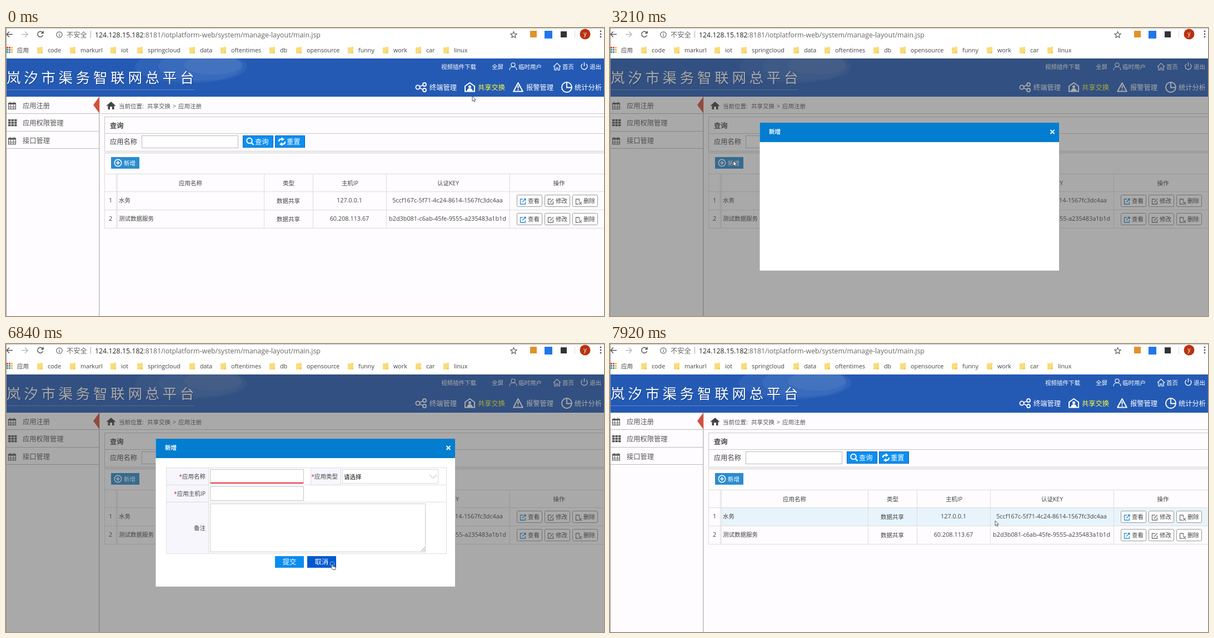
Animation, 1076 px wide and 520 px high, one loop 8000 ms. Source, as an HTML page:

```html
<!DOCTYPE html>
<html lang="zh">
<head>
<meta charset="utf-8">
<title>应用注册</title>
<style>
html, body { margin: 0; width: 100%; height: 100%; overflow: hidden; background: #fff; }
svg { display: block; width: 1076px; height: 520px; font-family: "Open Sans", "Noto Sans CJK SC", "Noto Sans CJK", sans-serif; }
text { white-space: pre; }
</style>
</head>
<body>
<svg id="stage" viewBox="0 0 1076 520" xmlns="http://www.w3.org/2000/svg"></svg>
<script>
const S = 10.5, M = 12.25, L = 10.85;
const INK = '#444', BLUE = '#0a8df0';

const box = (x, y, r, b, fill, stroke, more = '') => stroke
  ? `<rect x="${x + .5}" y="${y + .5}" width="${r - x - 1}" height="${b - y - 1}" fill="${fill}" stroke="${stroke}" ${more}/>`
  : `<rect x="${x}" y="${y}" width="${r - x}" height="${b - y}" fill="${fill}" ${more}/>`;
const txt = (x, mid, size, str, fill = INK, more = '') =>
  `<text x="${x}" y="${mid + size * .37}" font-size="${size}" fill="${fill}" ${more}>${str}</text>`;
const ctr = (x, mid, size, str, fill) => txt(x, mid, size, str, fill, 'text-anchor="middle"');
const end = (x, mid, str) => txt(x, mid, S, str.replace('*', '<tspan fill="#e22">*</tspan>'), INK, 'text-anchor="end"');
const line = (d, stroke, w = 1, more = '') => `<path d="${d}" fill="none" stroke="${stroke}" stroke-width="${w}" ${more}/>`;
const hl = (y, x, r, c) => box(x, y, r, y + 1, c);
const vl = (x, y, b, c) => box(x, y, x + 1, b, c);
const at = (x, y, art) => `<g transform="translate(${x} ${y})">${art}</g>`;
const layer = (id, art) => `<g id="${id}">${art}</g>`;
const join = (list, fn) => list.map(fn).join('');
const ring = (x, y, r, c, w = 1.5) => `<circle cx="${x}" cy="${y}" r="${r}" fill="none" stroke="${c}" stroke-width="${w}"/>`;
const dot = (x, y, r, c) => `<circle cx="${x}" cy="${y}" r="${r}" fill="${c}"/>`;

// Icons
const folder = '<path d="M0 1h6v-1h4v12h-10z" fill="#f9dc7a"/><path d="M7 12v-3h3z" fill="#e9bd4a"/>';
const calendar = box(0, 2, 14, 14, 'none', '#555') + box(0, 2, 14, 5, '#555') + vl(3, 0, 4, '#555') + vl(10, 0, 4, '#555') +
  line('M1 8.5h12M1 11h12M4.5 5v8M9.5 5v8', '#777');
const tiles = join([0, 1, 2], r => join([0, 1, 2], c => box(c * 5.5, r * 4.5, c * 5.5 + 4.5, r * 4.5 + 3.5, '#555')));
const house = '<path d="M0 7L8 0l8 7-1 1.3-1.5-1.3V14H10V9H6v5H2.5V7L1 8.3z" fill="#444"/>';

function browser() {
  const names = ['code', 'markurl', 'iot', 'springcloud', 'data', 'oftentimes', 'db', 'opensource', 'funny', 'work', 'car', 'linux'];
  const lefts = [75, 134, 207, 255, 349, 405, 493, 541, 634, 697, 756, 806];
  const hues = ['#e44', '#e44', '#fb3', '#3a6', '#48e', '#fb3', '#3a6', '#48e', '#fb3'];
  return box(0, 0, 1076, 55, '#fff') +
    line('M12 11.5H1M6 6.5l-5 5 5 5', '#555', 1.5) +
    line('M28 11.5h11M34 6.5l5 5-5 5', '#bbb', 1.5) +
    line('M66 8.5a5 5 0 1 0 .5 4.5M67 5.5v4h-4', '#555', 1.5) +
    ring(96, 12, 5.2, '#666', 1.2) + box(95.4, 11, 96.6, 15, '#666') + box(95.4, 8.8, 96.6, 10, '#666') +
    txt(109, 12, M, '不安全', '#666') + vl(152, 5, 18, '#aaa') +
    txt(160, 12, 12.35, '<tspan fill="#222">124.128.15.182</tspan>:8181/iotplatform-web/system/manage-layout/main.jsp', '#666') +
    line('M913.5 6.5l1.6 3.7 4 .4-3 2.7.9 4-3.5-2.1-3.5 2.1.9-4-3-2.7 4-.4z', '#555', 1.1) +
    box(943, 5, 955, 17, '#e0922c') + box(969, 5, 983, 19, '#2176ea') + box(998, 6, 1009, 17, '#303436') +
    vl(1023, 5, 18, '#ddd') + dot(1042, 11, 9.5, '#b8330f') + ctr(1042, 10, S, 'y', '#fff') +
    join([6, 11, 16], y => dot(1070, y, 1.4, '#555')) +
    join(hues, (c, i) => at(1 + i % 3 * 4, 34 + Math.floor(i / 3) * 4, box(0, 0, 3, 3, c))) +
    txt(20, 40, S, '应用') +
    join(names, (n, i) => at(lefts[i] - 19, 34, folder) + txt(lefts[i], 40, 10.75, n));
}

function header() {
  const w = '#fff';
  const title = '岚汐市渠务智联网总平台', spread = 'letter-spacing="5.7"';
  return `<clipPath id="top"><rect y="55" width="1076" height="69"/></clipPath><g clip-path="url(#top)">` +
    box(0, 55, 1076, 124, '#245ab4') +
    join([[333, 70, 101, 29], [350, 69, 76, 26], [372, 67, 52, 17]], ([x, y, a, b]) =>
      `<ellipse cx="${x}" cy="${y}" rx="${a}" ry="${b}" fill="#b4c8e0" fill-opacity=".08"/>`) + '</g>' +
    hl(111, 0, 338, '#5d8bcd') +
    txt(2, 91, 25.5, title, '#163f86', spread) + txt(1, 90, 25.5, title, w, spread) +
    txt(783, 70, S, '视频插件下载', w) + txt(874, 70, S, '全屏', w) +
    ring(912.5, 66.5, 3.5, w, 1.2) + line('M906 76c0-8 13-8 13 0', w, 1.2) + txt(922, 70, S, '临时用户', w) +
    line('M985 70l6.5-6.5 6.5 6.5M987 69v7h3v-4h3v4h3v-7', w, 1.2) + txt(1001, 70, S, '首页', w) +
    line('M1037 65a5.5 5.5 0 1 0 7 0M1040.5 62v7', w, 1.4) + txt(1050, 70, S, '退出', w) +
    ring(741, 107, 3.6, w, 1.8) + ring(753, 102, 3, w, 1.8) + ring(753, 112, 3, w, 1.8) + line('M744 106l6-3M744 108l6 3', w, 1.6) +
    txt(762, 107, M, '终端管理', w) +
    line('M826 114.5v-9.5l8.5-6 8.5 6v9.5z', w, 2) + dot(834.5, 106, 2.5, w) + '<path d="M829.5 114c0-7 10-7 10 0z" fill="#fff"/>' +
    txt(849, 107, M, '共享交换', '#ff3') +
    line('M921.5 99l8.3 15.5h-16.6z', w, 2, 'stroke-linejoin="round"') + line('M921.5 104v5M921.5 110.5v2', w, 2) +
    txt(936, 107, M, '报警管理', w) +
    ring(1009, 107, 9, w, 1.9) + line('M1009 99v8.5h8', w, 1.8) + txt(1023, 107, M, '统计分析', w);
}

function sidebar() {
  return vl(167, 124, 520, '#bbb') + vl(168, 124, 520, '#ddd') +
    '<path d="M168 124l-11 15 11 15z" fill="#d2503c"/>' +
    join(['应用注册', '应用权限管理', '接口管理'], (n, i) => {
      const y = 140 + i * 31.8;
      return at(4, y - 7, i === 1 ? tiles : calendar) + txt(30, y, M, n, '#555') + hl([154, 186, 217][i], 0, 168, '#bbb');
    });
}

const addButton = fill => box(189, 233, 240, 254, fill) + ring(201.5, 243.5, 6.2, '#fff', 1.5) +
  line('M198 243.5h7M201.5 240v7', '#fff', 1.7) + txt(212, 244, S, '新增', '#fff');

function rowButtons(y) {
  const g = '#777', b = '#2b8fd8';
  const art = [
    line('M5 1h-4.5v9h9v-4M4 6.5L10 .5M6.5 .5h3.5v3.5', b, 1.3),
    line('M6 1h-5.5v9h9v-5M4 7l6-6.5', g, 1.4),
    line('M5 10h-4.5V1h6v4M6 6l5 5M11 6l-5 5', g, 1.3)];
  return join(['查看', '修改', '删除'], (n, i) => {
    const x = 919 + i * 50;
    return box(x, y - 11, x + 46, y + 11, '#fff', '#999', 'rx="2"') + at(x + 6, y - 4, art[i]) + txt(x + 20, y, S, n);
  });
}

function content() {
  const grid = '#ddd', edge = '#c8c8c8';
  const cols = [[332, '应用名称'], [508.5, '类型'], [619, '主机IP'], [795.5, '认证KEY'], [995, '操作']];
  const rows = [['水务', '127.0.0.1', '5ccf167c-5f71-4c24-8614-1567fc3dc4aa'],
    ['测试数据服务', '60.208.113.67', 'b2d3b081-c6ab-45fe-9555-a235483a1b1d']];
  return at(181, 133, house) + txt(203, 141, S, '当前位置:', '#555') + txt(254, 141, S, '共享交换', '#555') +
    txt(300, 141, S, '&gt;', '#555') + txt(310, 141, S, '应用注册', '#555') + hl(154, 168, 1076, edge) +
    box(177, 160, 1080, 223, 'none', edge) + hl(190, 177, 1076, edge) +
    txt(187, 176, M, '查询', INK, 'font-weight="bold"') + txt(187, 205, M, '应用名称') +
    box(244, 194, 418, 217, '#fff', '#bbb') +
    box(426, 194, 481, 216, '#0a8ff2', '#0b5fae') + box(484, 194, 538, 216, '#0a8ff2', '#0b5fae') +
    ring(438, 203.5, 4.8, '#fff', 2) + line('M441.5 207l4 4', '#fff', 2.4) + txt(448, 205, M, '查询', '#fff') +
    line('M491 205c0-4 3-5 7-4M502 205c0 5-3 5-7 5', '#fff', 2.4) +
    '<path d="M496 197l5 4-5 3zM497 206l-5 4 5 3z" fill="#fff"/>' + txt(505, 205, M, '重置', '#fff') +
    box(177, 225, 1080, 362, 'none', grid) + hl(225, 177, 1076, edge) +
    layer('row1', box(201, 296, 1076, 328, '#e8f4fb')) + layer('row2', box(201, 329, 1076, 361, '#e8f4fb')) +
    join([263, 295, 328, 361], y => hl(y, 177, 1076, grid)) +
    join([199, 201, 465, 553, 685, 907], x => vl(x - 1, 263, 361, grid)) +
    join(cols, ([x, n]) => ctr(x, 280, S, n)) +
    join(rows, ([name, ip, key], i) => {
      const y = 312 + i * 33;
      return ctr(188, y - 1, L, i + 1) + txt(203, y - .5, S, name) + ctr(508, y, S, '数据共享') +
        ctr(618, y - 1, L, ip) + ctr(794.5, y - 1, L, key) + rowButtons(y);
    });
}

function dialog() {
  const e = '#ddd', label = '#f6f6fc', field = '#c2c2c2';
  const form = box(288, 223, 793, 379, '#fff', e) + box(289, 224, 364, 378, label) + box(549, 224, 602, 254, label) +
    join([254, 285], y => hl(y, 288, 793, e)) + vl(364, 223, 378, e) + vl(548, 223, 254, e) + vl(602, 223, 254, e) +
    end(359, 239, '*应用名称') + end(597, 239, '*应用类型') + end(359, 270, '*应用主机IP') + end(359, 332, '备注') +
    box(367, 226, 536, 252, '#fff', field) + box(367, 257, 536, 283, '#fff', field) +
    layer('hot', box(367, 226, 536, 252, 'none', '#666', 'stroke-width="1.3"')) +
    layer('bad', box(368, 250, 535, 252, '#e8303a')) + layer('caret', vl(373, 232, 246, '#222')) +
    box(605, 226, 778, 252, '#fff', '#d6d6d6') + txt(608, 240, S, '请选择', '#000', 'font-weight="500"') +
    line('M762 236l6.5 6.5 6.5-6.5', '#ccc', 1.2) +
    box(367, 288, 755, 376, '#fff', '#ccc') + line('M747 374l7-7M751 374l3-3', '#888') +
    box(484, 383, 536, 404, BLUE) + ctr(510, 393.5, M, '提交', '#fff') +
    `<rect id="cancel" x="542" y="383" width="52" height="21"/>` + ctr(568, 393.5, M, '取消', '#fff') +
    layer('list', box(367, 252, 537, 299, '#fff', '#c4c4c4') + layer('pick', box(368, 254, 536, 275, '#e8e8e8')) +
      txt(373, 264, S, '水务', '#222') + txt(373, 287, S, '测试数据服务', '#222'));
  return box(0, 55, 1076, 520, '#444', '', 'fill-opacity=".45"') +
    box(269.5, 171, 808, 438, '#fff') + box(269.5, 171, 808, 206, '#027dd0') +
    txt(286, 187, S, '新增', '#fff', 'font-weight="bold"') + line('M792.5 184l7 7M799.5 184l-7 7', '#fff', 1.8) +
    layer('form', form);
}

const pointers = {
  a: '<path d="M0 0v9l2-1.8 1.5 3 1.5-.7-1.4-2.9h2.7z" fill="#fff" stroke="#333" stroke-width=".8"/>',
  h: '<path d="M0 1q1-2 2 0v3.5l4.5 1q1 .3.8 1.5l-.8 3.5h-4.5l-3-4q0-1.4 1-.5z" fill="#fff" stroke="#333" stroke-width=".8"/>',
  i: line('M-2.5-5h2l.5.5.5-.5h2M0-4.5v9M-2.5 5h2l.5-.5.5.5h2', '#333')
};

document.getElementById('stage').innerHTML =
  box(0, 0, 1076, 520, '#fefcfe') + header() + sidebar() + content() +
  layer('addCold', addButton('#2b8ccf')) + layer('addHot', addButton('#0d74c4')) +
  layer('dialog', dialog()) + browser() + hl(0, 0, 1076, '#bbb') + vl(0, 0, 520, '#999') +
  layer('press', ring(587, 397, 4, '#6fb4ff', 1)) +
  join(Object.keys(pointers), k => layer('p' + k, pointers[k]));

// Pointer steps: time, x, y, shape
const path = [
  [0, 839, 123, 'a'], [120, 785, 150, 'a'], [270, 634, 216, 'a'], [420, 390, 262, 'a'], [540, 197, 264, 'a'],
  [690, 118, 228, 'a'], [810, 48, 190, 'h'], [930, 10, 168, 'h'], [1050, 36, 157, 'h'], [1170, 77, 156, 'h'],
  [1320, 88, 178, 'h'], [1440, 118, 205, 'h'], [1560, 158, 230, 'a'], [1680, 190, 241, 'h'], [1800, 210, 242, 'h'],
  [1920, 221, 241, 'h'], [3210, 222, 240, 'a'], [3600, 296, 250, 'a'], [3750, 400, 236, 'i'],
  [3900, 425, 222, 'a'], [4020, 430, 211, 'a'], [4140, 426, 216, 'a'], [4300, 423, 236, 'i'],
  [5010, 446, 230, 'i'], [5130, 465, 213, 'a'], [5290, 456, 234, 'i'], [5410, 444, 246, 'i'],
  [5550, 454, 256, 'a'], [5670, 478, 264, 'a'], [5790, 506, 271, 'a'], [5910, 536, 278, 'a'],
  [6060, 622, 305, 'a'], [6180, 653, 335, 'a'], [6300, 614, 354, 'a'], [6450, 594, 384, 'a'],
  [6570, 586, 397, 'h'], [6980, 586, 396, 'a'], [7250, 588, 372, 'a'], [7370, 592, 350, 'a'], [7500, 598, 336, 'a'],
  [7650, 640, 333, 'a'], [7770, 680, 336, 'a'], [7920, 693, 319, 'a']
];

const el = id => document.getElementById(id);
const show = (id, on) => { el(id).style.visibility = on ? 'inherit' : 'hidden'; };

function draw(t) {
  const [, x, y, kind] = path.findLast(p => p[0] <= t);
  const within = (a, b) => t >= a && t < b;
  for (const k in pointers) show('p' + k, k === kind);
  el('p' + kind).setAttribute('transform', `translate(${x} ${y})`);
  show('addHot', within(1680, 3210));
  show('dialog', within(3210, 6980));
  show('form', within(3350, 6980));
  show('hot', within(3750, 3900) || within(4300, 6720));
  show('bad', within(6720, 6980));
  show('list', within(4610, 6720));
  show('pick', within(5550, 5910));
  show('caret', within(4610, 5130) || within(5670, 6180));
  show('press', within(6840, 6980));
  show('row1', t >= 7920);
  show('row2', within(7370, 7920));
  el('cancel').setAttribute('fill', t < 6570 ? BLUE : t < 6720 ? '#0a78dc' : '#0058d0');
}

const start = performance.now();
function tick() {
  draw((performance.now() - start) % 8000);
  requestAnimationFrame(tick);
}
tick();
</script>
</body>
</html>
```
